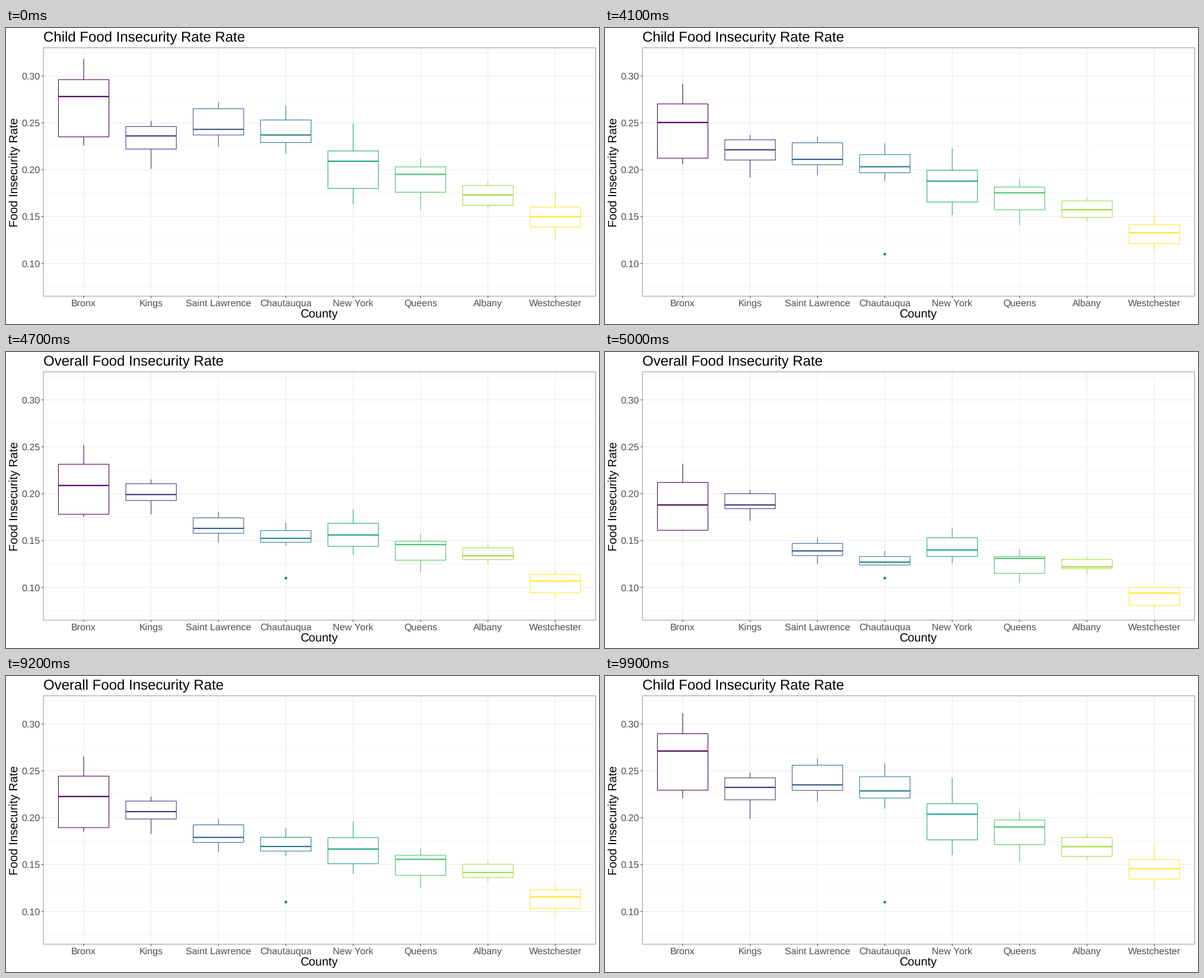
These frames come from a looping animation (1000 by 500 pixels, 10 s). A matplotlib script:

```python
import numpy as np
import matplotlib
import matplotlib.pyplot as plt
from matplotlib.animation import FuncAnimation
from matplotlib.patches import Circle, Rectangle

plt.rcParams.update({
    "font.family": "Liberation Sans",
    "text.hinting": "none",
    "text.hinting_factor": 1,
    "toolbar": "None",
})

# Stage in pixels; at 72 dpi one point is one pixel.
WIDTH, HEIGHT, DPI = 1000, 500, 72
LEFT, RIGHT, TOP, BOTTOM = 62.85, 994.5, 33.3, 453.3
V_MIN, V_MAX = 0.06495, 0.33005
LINE = 1.07

FRAMES, HALF, HOLD = 100, 50, 38
STEPS = HALF - HOLD + 1
TITLES = ["Child Food Insecurity Rate Rate", "Overall Food Insecurity Rate"]

# Thousandths: low whisker, lower quartile, median, upper quartile, high whisker
COUNTIES = {
    "Bronx": ([226, 235, 278, 296, 318], [160, 161, 188, 212, 232]),
    "Kings": ([201, 222, 236, 246, 252], [171, 184, 188, 200, 204]),
    "Saint Lawrence": ([225, 237, 243, 265, 272], [125, 134, 139, 147, 153]),
    "Chautauqua": ([217, 229, 237, 253, 268], [123, 124, 127, 133, 139]),
    "New York": ([163, 180, 209, 220, 249], [126, 133, 140, 153, 163]),
    "Queens": ([157, 176, 195, 203, 212], [105, 115, 131, 133, 140]),
    "Albany": ([158, 162, 173, 183, 187], [115, 120, 122, 130, 133]),
    "Westchester": ([127, 139, 150, 160, 177], [77, 81, 94, 100, 100]),
}
STATES = np.array(list(COUNTIES.values())).transpose(1, 0, 2) / 1000
COLORS = matplotlib.colormaps["viridis"](np.linspace(0, 1, len(COUNTIES)))

UNIT = (RIGHT - LEFT) / (len(COUNTIES) + 0.2)
BOX_HALF = 0.375 * UNIT
CENTERS = LEFT + UNIT * (0.6 + np.arange(len(COUNTIES)))


def y_px(value):
    return TOP + (V_MAX - value) / (V_MAX - V_MIN) * (BOTTOM - TOP)


fig = plt.figure(figsize=(WIDTH / DPI, HEIGHT / DPI), dpi=DPI, facecolor="white")
ax = fig.add_axes([0, 0, 1, 1])
ax.set(xlim=(0, WIDTH), ylim=(HEIGHT, 0))
ax.axis("off")


def line(xs, ys, color, width=LINE, z=1):
    return ax.plot(xs, ys, color=color, lw=width, zorder=z,
                   solid_capstyle="butt", snap=False)[0]


def label(x, y, text, size, color="black", ha="center", **kwargs):
    return ax.text(x, y, text, fontsize=size, color=color, ha=ha,
                   va="baseline", **kwargs)


# Grid, ticks and labels
for value in np.arange(0.075, 0.33, 0.05):
    line([LEFT, RIGHT], [y_px(value)] * 2, "#ebebeb", LINE / 2)
for value in np.arange(0.10, 0.31, 0.05):
    y = y_px(value)
    line([LEFT, RIGHT], [y, y], "#ebebeb")
    line([LEFT - 2.75, LEFT], [y, y], "#333333")
    label(LEFT - 4.95, y + 5.7, f"{value:.2f}", 16, "#4d4d4d", "right")
for x, name in zip(CENTERS, COUNTIES):
    line([x, x], [TOP, BOTTOM], "#ebebeb")
    line([x, x], [BOTTOM, BOTTOM + 2.75], "#333333")
    label(x, 469.8, name, 16, "#4d4d4d")

inset = LINE / 4
ax.add_patch(Rectangle((LEFT + inset, TOP + inset),
                       RIGHT - LEFT - 2 * inset, BOTTOM - TOP - 2 * inset,
                       fill=False, ec="#333333", lw=LINE / 2, snap=False, zorder=9))

label((LEFT + RIGHT) / 2, 490.2, "County", 20)
label(19.8, (TOP + BOTTOM) / 2, "Food Insecurity Rate", 20, rotation=90,
      rotation_mode="anchor")
title = label(LEFT, 22.7, TITLES[0], 24, ha="left")


class BoxPlot:
    def __init__(self, x, color):
        self.lower = line([x, x], [0, 0], color, z=3)
        self.upper = line([x, x], [0, 0], color, z=3)
        self.box = Rectangle((x - BOX_HALF, 0), 2 * BOX_HALF, 0, fc="white",
                             ec=color, lw=LINE, snap=False, zorder=4)
        ax.add_patch(self.box)
        self.median = line([x - BOX_HALF, x + BOX_HALF], [0, 0], color, 2 * LINE, 5)

    def update(self, values):
        low, q1, median, q3, high = y_px(values)
        self.lower.set_ydata([low, q1])
        self.upper.set_ydata([q3, high])
        self.box.set_y(q3)
        self.box.set_height(q1 - q3)
        self.median.set_ydata([median, median])


boxes = [BoxPlot(x, color) for x, color in zip(CENTERS, COLORS)]
outlier = ax.add_patch(Circle((CENTERS[3], y_px(0.11)), 2.3, fc=COLORS[3],
                              ec="none", zorder=6))


def draw(frame):
    start, local = divmod(frame, HALF)
    step = max(0, local - HOLD + 1)
    values = STATES[start] + (STATES[1 - start] - STATES[start]) * step / STEPS
    for box, row in zip(boxes, values):
        box.update(row)
    title.set_text(TITLES[1 - start if step > (STEPS + 1) // 2 else start])
    outlier.set_visible(frame >= HOLD)
    return []


anim = FuncAnimation(fig, draw, frames=FRAMES, interval=100, repeat=True,
                     repeat_delay=0, blit=False)
plt.show()
```
